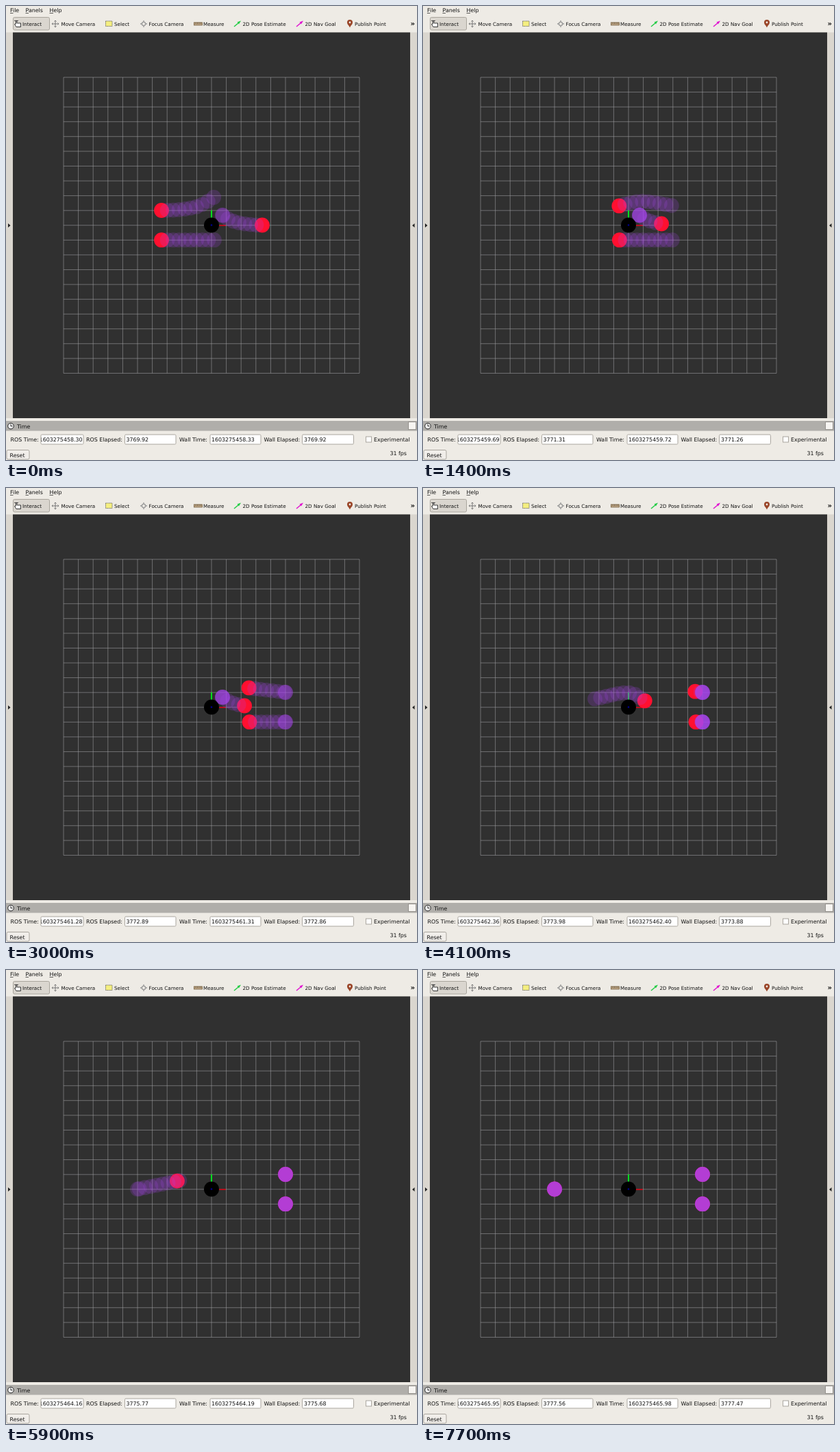
Recreate the animation shown at these times as an HTML page. Size 600 px wide and 662 px high, loop 7.8 s.

```html
<!DOCTYPE html>
<html lang="en">
<head>
<meta charset="utf-8">
<title>Robot view</title>
<style>
  html, body { margin: 0; width: 100%; height: 100%; overflow: hidden; background: #eeebe5; }
  svg { display: block; }
  text { font: 7.9px "DejaVu Sans", sans-serif; fill: #111; text-rendering: geometricPrecision; }
  .tools text { font-size: 7.2px; }
  .field { fill: #fff; stroke: #aaa69f; }
  .robot { fill: #ff1030; }
  .plan { fill: #ab46f2; fill-opacity: .2; }
</style>
</head>
<body>
<svg id="stage" width="600" height="662" viewBox="0 0 600 662">
  <rect width="600" height="662" fill="#eeebe5"/>
  <text x="6" y="9">File</text>
  <text x="28.5" y="9">Panels</text>
  <text x="63.5" y="9">Help</text>
  <path d="M6 10.5h4.5M28.5 10.5h4.5M63.5 10.5h5.5" stroke="#222" stroke-width=".7"/>

  <g class="tools">
    <rect x="10.5" y="16.5" width="53" height="18.5" rx="2" fill="#dad6cf" stroke="#a9a59d"/>
    <path d="M15 30.5L12.5 26.5L14.5 26V21.5H16V25H21.5V30.5Z" fill="#fff" stroke="#222" stroke-width=".9"/>
    <path d="M12 21.5h6" stroke="#333" stroke-width=".8"/>
    <g id="cross" fill="none" stroke="#777" stroke-width="1">
      <path d="M67 26h10M72 21v10M70.500 22.500L72 21l1.500 1.500M70.500 29.500L72 31l1.500-1.500M68.500 24.500L67 26l1.500 1.500M75.500 24.500L77 26l-1.500 1.500"/>
    </g>
    <rect x="145.500" y="22" width="9.500" height="7.500" fill="#f4ee80" stroke="#555" stroke-width=".8" stroke-dasharray="1.500 .8"/>
    <g fill="none" stroke="#999" stroke-width="1.300">
      <circle cx="201" cy="26" r="2.600"/>
      <path d="M196 26h3M203 26h3M201 21v3M201 28v3"/>
    </g>
    <rect x="274.500" y="24" width="12" height="4" fill="#b9a283" stroke="#75603f" stroke-width=".8"/>
    <path d="M277 24v2M279.500 24v2M282 24v2M284.500 24v2" stroke="#54432b" stroke-width=".6"/>
    <g stroke-width="1.500">
      <path d="M333 30L339 25" stroke="#22cc44"/>
      <path d="M337.500 23.500L343 21.500L340 26.500Z" fill="#22cc44"/>
      <path d="M424 30L430 25" stroke="#e010d0"/>
      <path d="M428.500 23.500L434 21.500L431 26.500Z" fill="#e010d0"/>
    </g>
    <path d="M502 31.500C501 28.500 498 27 498 24A4 4 0 0 1 506 24C506 27 503 28.500 502 31.500Z" fill="#9a4528"/>
    <circle cx="502" cy="24" r="1.400" fill="#eeebe5"/>
    <text x="24" y="28.500">Interact</text>
    <text x="80.500" y="28.500">Move Camera</text>
    <text x="158" y="28.500">Select</text>
    <text x="208.500" y="28.500">Focus Camera</text>
    <text x="288" y="28.500">Measure</text>
    <text x="345.500" y="28.500">2D Pose Estimate</text>
    <text x="436.500" y="28.500">2D Nav Goal</text>
    <text x="509" y="28.500">Publish Point</text>
  </g>
  <text x="590.500" y="29" style="font-size:10px;font-weight:bold">»</text>

  <path d="M0 38.500h600v562.500H0z" fill="#dad6cf"/>
  <rect x="10" y="38.500" width="580" height="562.500" fill="#303030"/>
  <path d="M3 317L6.500 320L3 323ZM596.500 317L593 320L596.500 323Z" fill="#222"/>
  <path id="grid" fill="none" stroke="#a0a0a4" stroke-opacity=".56"/>
  <path d="M300 319.500V298" stroke="#00e020" stroke-width="2"/>
  <path d="M300 320H321" stroke="#d00010" stroke-width="1.600"/>
  <g id="robots"></g>
  <circle cx="300" cy="319.500" r="11"/>
  <circle cx="300" cy="319.500" r="1.300" fill="#000090"/>

  <rect y="601" width="600" height="61" fill="#eeebe5"/>
  <rect y="605" width="600" height="14.500" fill="#b0aeaa"/>
  <circle cx="7" cy="612.500" r="4.300" fill="#eee" stroke="#222"/>
  <path d="M7 609.500V612.500H9.500" fill="none" stroke="#222" stroke-width=".9"/>
  <text x="16" y="615.500">Time</text>
  <rect x="587.500" y="606.500" width="11" height="11" fill="#f6f4f1" stroke="#96938e"/>
  <text x="6.500" y="635">ROS Time:</text>
  <text x="117" y="635">ROS Elapsed:</text>
  <text x="253" y="635">Wall Time:</text>
  <text x="376.500" y="635">Wall Elapsed:</text>
  <g class="field">
    <rect x="51" y="625" width="62" height="14" rx="1.500"/>
    <rect x="173.500" y="625" width="74.500" height="14" rx="1.500"/>
    <rect x="298" y="625" width="74" height="14" rx="1.500"/>
    <rect x="432.500" y="625" width="75" height="14" rx="1.500"/>
    <rect x="525.500" y="628" width="8" height="8"/>
  </g>
  <svg x="51.500" y="625" width="61" height="14"><text class="clock" x="60" y="10" text-anchor="end"></text></svg>
  <text class="clock" x="175.500" y="635"></text>
  <text class="clock" x="300" y="635"></text>
  <text class="clock" x="435" y="635"></text>
  <text x="537" y="635">Experimental</text>
  <text x="560.500" y="655">31 fps</text>
  <rect x="1" y="647.500" width="33" height="13.500" rx="2" fill="#f1eeea" stroke="#aaa69f"/>
  <text x="5.500" y="657.500">Reset</text>
</svg>
<script>
const NS = "http://www.w3.org/2000/svg";
const LOOP = 7800, STEP = 100;
const RADIUS = 10.9, PLAN_STEPS = 9, SPACING = 8.55;

const clamp = (v, lo, hi) => Math.min(hi, Math.max(lo, v));

function lerpKeys(keys, t) {
  const i = keys.findIndex(k => k[0] >= t);
  if (i === 0) return keys[0][1];
  if (i < 0) return keys[keys.length - 1][1];
  const [t0, v0] = keys[i - 1], [t1, v1] = keys[i];
  return v0 + (v1 - v0) * (t - t0) / (t1 - t0);
}

function add(parent, tag, attrs) {
  const el = document.createElementNS(NS, tag);
  for (const k in attrs) el.setAttribute(k, attrs[k]);
  return parent.appendChild(el);
}

function place(el, p) {
  el.setAttribute("cx", p.x);
  el.setAttribute("cy", p.y);
}

function makePath(d) {
  const path = document.createElementNS(NS, "path");
  path.setAttribute("d", d);
  return path;
}

let grid = "";
for (let i = 0; i <= 20; i++) {
  const d = i * 21.6;
  grid += `M${84 + d} 104V535.5M84 ${104 + d * 431.5 / 432}H516`;
}
document.getElementById("grid").setAttribute("d", grid);

// Travelled distance along each path, in pixels by seconds
const convoy = [[0, 0], [2, 85.5], [3, 128.5], [4.1, 171.5], [4.4, 181], [8, 335]];
const crossing = [[0, 0], [.6, 26], [3.5, 26], [4.1, 51.5], [5.9, 129.5], [7.3, 189], [8, 219]];
const DEPART = 3.5, WAIT_POINT = 61;

// The early plan swings wider than the route finally driven
function detour(t, ahead) {
  const far = clamp((ahead - 45) / 32, 0, 1);
  const hump = Math.sin(Math.PI * clamp(t / 2, 0, 1)) * Math.sin(Math.PI * clamp(ahead / 77, 0, 1));
  return -10 * Math.exp(-t / .75) * far * far - 4 * hump;
}

const robots = [
  { d: "M227 298C240 298 250 297.500 261 296C279 293.500 295 288.500 316 288.200C331 288 342 290 355 291.500L408 298", keys: convoy, bend: detour },
  { d: "M227 341.200H408", keys: convoy },
  { d: "M374 319.500C363 319.500 356 318.500 348 317.500C338 316 325 313 316 305C311 300.500 304 298.500 298 298.500C286 298.500 272 303 258 306L192 319.500",
    keys: crossing,
    lag: [[4.1, 0], [5.9, 12]],
    limit: t => t < DEPART ? WAIT_POINT : Infinity }
];

const layer = document.getElementById("robots");
for (const r of robots) {
  r.path = makePath(r.d);
  r.length = r.path.getTotalLength();
  r.body = add(layer, "circle", { r: RADIUS, class: "robot" });
  r.plan = Array.from({ length: PLAN_STEPS }, () => add(layer, "circle", { r: RADIUS, class: "plan" }));
}

function drawRobot(r, t) {
  const dist = lerpKeys(r.keys, t);
  const start = dist - (r.lag ? lerpKeys(r.lag, t) : 0);
  const end = Math.min(r.length, r.limit ? r.limit(t) : Infinity);
  place(r.body, r.path.getPointAtLength(Math.min(dist, r.length)));
  r.plan.forEach((dot, i) => {
    const s = Math.min(start + (i + 1) * SPACING, end);
    const p = r.path.getPointAtLength(s);
    const dy = r.bend ? r.bend(t, s - dist) : 0;
    place(dot, { x: p.x, y: p.y + dy });
  });
}

const marks = [0, .8, 2, 3, 4.1, 5.9, 7.7];
const EPOCH = 1603275450;
const clocks = [
  [EPOCH, [8.30, 9.10, 10.28, 11.28, 12.36, 14.16, 15.95]],
  [3760, [9.92, 10.72, 11.90, 12.89, 13.98, 15.77, 17.56]],
  [EPOCH, [8.33, 9.13, 10.32, 11.31, 12.40, 14.19, 15.98]],
  [3760, [9.92, 10.68, 11.84, 12.86, 13.88, 15.68, 17.47]]
].map(([base, values]) => ({ base, keys: marks.map((m, i) => [m, values[i]]) }));
const labels = document.querySelectorAll(".clock");

function draw(t) {
  robots.forEach(r => drawRobot(r, t));
  clocks.forEach((c, i) => {
    labels[i].textContent = (c.base + lerpKeys(c.keys, t)).toFixed(2);
  });
}

const origin = performance.now();
let shown = -1;
function tick() {
  const frame = Math.floor((performance.now() - origin) % LOOP / STEP);
  if (frame !== shown) {
    shown = frame;
    draw(frame * STEP / 1000);
  }
  requestAnimationFrame(tick);
}
tick();
</script>
</body>
</html>
```
